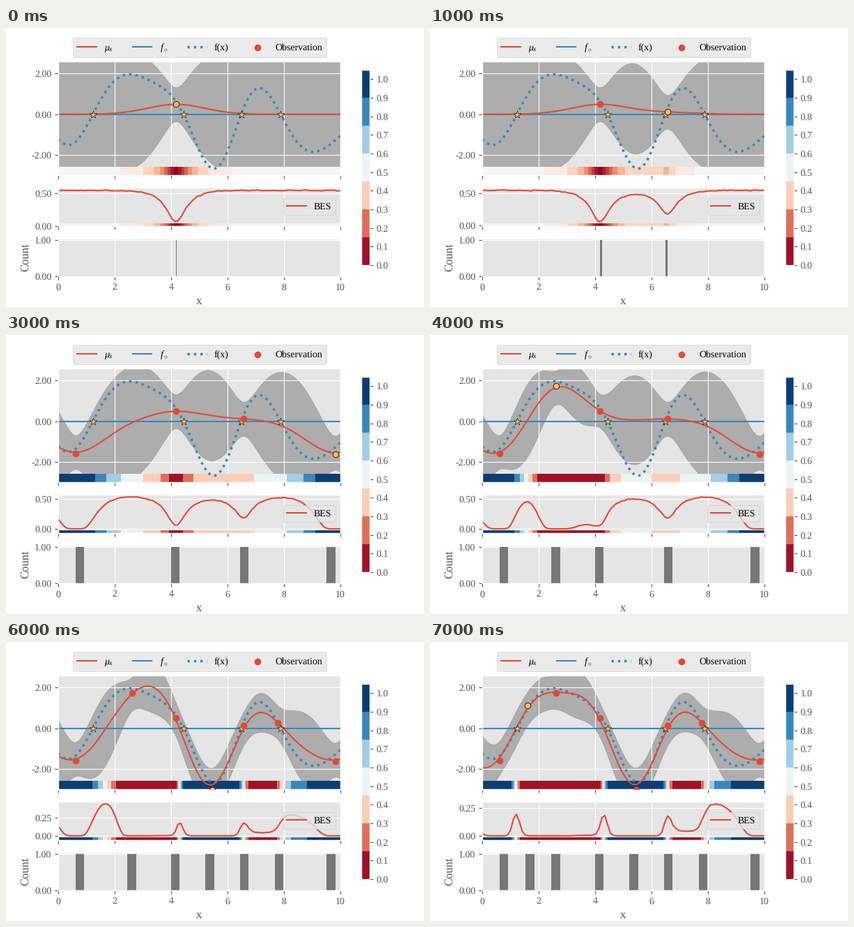
A matplotlib script that plays this animation: 600 px wide and 400 px high, repeating every 8000 ms.

```python
import math

import matplotlib.pyplot as plt
import numpy as np
from matplotlib.animation import FuncAnimation
from matplotlib.ticker import FormatStrFormatter

plt.style.use("ggplot")
plt.rcParams.update({
    "font.family": "Liberation Serif",
    "mathtext.fontset": "custom",
    "mathtext.rm": "Liberation Serif",
    "mathtext.it": "Liberation Serif:italic",
    "text.hinting": "none",
})

RED, BLUE, GRAY, GOLD = "#E24A33", "#348ABD", "#777777", "#FBC15E"
LENGTH, AMP, NOISE = 1.02, 2.16, 0.092
STRIP = 0.08
COARSE = np.arange(8) * 0.15
FINE = np.arange(10) * 0.06

# Samples in the order in which they are taken
OBS_X = np.array([4.173, 6.568, 0.617, 9.815, 2.617, 7.778, 5.457, 1.605])
OBS_Y = np.array([0.505, 0.12, -1.58, -1.61, 1.73, 0.25, -3.0, 1.11])

ROOTS = [1.228, 4.437, 6.482, 7.878]
NODES_X = np.array([0, 0.4, *ROOTS, 2.52, 3, 3.5, 5.53, 7.13, 9.2, 10])
NODES_Y = np.array([-1.22, -1.5, 0, 0, 0, 0, 1.95, 1.8, 1.46, -2.66, 1.28, -1.81, -1.05])

grid = np.linspace(0, 10, 100)
fine = np.linspace(0, 10, 400)

# Lookup tables: normal CDF and binary entropy of its value
Z = np.linspace(-6, 6, 2401)
CDF = np.array([0.5 * (1 + math.erf(z / math.sqrt(2))) for z in Z])
P = np.clip(CDF, 1e-12, 1 - 1e-12)
ENTROPY = -P * np.log(P) - (1 - P) * np.log(1 - P)


def kernel(a, b):
    return AMP * np.exp(-(a[:, None] - b[None, :]) ** 2 / (2 * LENGTH ** 2))


def posterior(x, y, at, noise=NOISE):
    """Mean and variance of a Gaussian process given samples."""
    cov = kernel(x, x) + noise * np.eye(len(x))
    cross = kernel(at, x)
    weights = np.linalg.solve(cov, cross.T)
    var = AMP - np.sum(cross * weights.T, axis=1)
    return weights.T @ y, np.maximum(var, 1e-9)


def entropy_gain(mean, var, seed):
    """Expected information about the sign from one noisy sample."""
    draws = np.random.default_rng(seed).standard_normal((4000, len(mean)))
    total = var + NOISE
    new_mean = mean + var / np.sqrt(total) * draws
    new_sd = np.sqrt(var * NOISE / total)
    after = np.interp(new_mean / new_sd, Z, ENTROPY).mean(axis=0)
    return np.interp(mean / np.sqrt(var), Z, ENTROPY) - after


def draw_strip(ax, prob, low, high, levels):
    ax.contourf(grid, [low, high], np.vstack([prob, prob]), levels=levels,
                cmap="RdBu", vmin=0, vmax=1)


def reset(ax):
    ax.clear()
    ax.set_xlim(0, 10)
    ax.set_xticks(range(0, 11, 2))
    ax.tick_params(labelbottom=ax is ax_count)
    ax.yaxis.set_major_formatter(FormatStrFormatter("%.2f"))


def draw_model(ax, count, prob, levels):
    reset(ax)
    xs, ys = OBS_X[:count], OBS_Y[:count]
    mean, var = posterior(xs, ys, fine)
    half = 1.96 * np.sqrt(var + NOISE)
    low, high = -2.57, 2.58

    # The band lies under the grid
    ax.fill_between(fine, mean - half, mean + half, color=GRAY, alpha=0.5, zorder=0)
    draw_strip(ax, prob, low - STRIP * (high - low), low, levels)
    handles = [
        ax.plot(fine, mean, color=RED, lw=1.5, zorder=2.2, label=r"$\mu_x$")[0],
        ax.axhline(0, color=BLUE, lw=1.5, label=r"$f_\circ$"),
        ax.plot(fine, truth, ":", color=BLUE, lw=2.5, zorder=2.1, label="f(x)")[0],
        ax.scatter(xs, ys, s=36, color=RED, linewidths=1, zorder=4, label="Observation"),
    ]
    ax.scatter(ROOTS, [0] * 4, s=62, marker="*", color=GOLD,
               edgecolors="black", linewidths=0.4, zorder=3)
    ax.scatter(xs[-1:], ys[-1:], s=36, color=GOLD, edgecolors="black",
               linewidths=0.5, zorder=5)
    ax.set_ylim(low - STRIP * (high - low), high)
    ax.set_yticks([-2, 0, 2])
    ax.legend(handles=handles, ncol=4, loc="center",
              bbox_to_anchor=(0.4633, 0.9295), bbox_transform=fig.transFigure,
              borderaxespad=0)


def draw_gain(ax, count, prob, gain, levels):
    reset(ax)
    span = np.ptp(gain)
    low, high = gain.min() - 0.035 * span, gain.max() + 0.065 * span
    bottom = low - STRIP * (high - low)
    if count == 1:
        bottom = min(bottom, 0)
    draw_strip(ax, prob, bottom, bottom + STRIP / (1 + STRIP) * (high - bottom), levels)
    ax.plot(grid, gain, color=RED, lw=1.5, label="BES")

    ax.set_ylim(bottom, high)
    for step in (0.5, 0.25):
        ticks = [t for t in np.arange(0, 1, step) if bottom <= t <= high]
        if len(ticks) > 1:
            break
    ax.set_yticks(ticks)
    ax.legend(loc="center right")


def draw_count(ax, count):
    reset(ax)
    ax.hist(OBS_X[:count], bins=30, color=GRAY)
    ax.set_ylim(0, 1.05)
    ax.set_yticks([0, 1])
    ax.set_xlabel("x")
    ax.set_ylabel("Count")


def draw_scale(ax):
    mids = (COARSE[:-1] + COARSE[1:]) / 2
    ax.pcolormesh([0, 1], COARSE, mids[:, None], cmap="RdBu", vmin=0, vmax=1)
    ax.grid(False)
    ax.set_xticks([])
    ax.set_ylim(0, 1.05)
    ax.set_yticks(np.arange(11) / 10)
    ax.yaxis.tick_right()
    ax.yaxis.set_major_formatter(FormatStrFormatter("%.1f"))


def update(frame):
    count = frame + 1
    mean, var = posterior(OBS_X[:count], OBS_Y[:count], grid)
    prob = 1 - np.interp(mean / np.sqrt(var), Z, CDF)
    levels = FINE if count <= 2 else COARSE
    draw_model(ax_model, count, prob, levels)
    draw_gain(ax_gain, count, prob, entropy_gain(mean, var, frame), levels)
    draw_count(ax_count, count)
    return []


truth, _ = posterior(NODES_X, NODES_Y, fine, noise=1e-4)

fig, (ax_model, ax_gain, ax_count) = plt.subplots(
    3, 1, figsize=(6, 4), dpi=100, gridspec_kw={"height_ratios": [3, 1, 1]})
fig.subplots_adjust(left=0.125, right=0.8, bottom=0.11, top=0.88, hspace=0.2)
draw_scale(fig.add_axes([0.85, 0.15, 0.02, 0.7]))

anim = FuncAnimation(fig, update, frames=8, interval=1000, repeat=True,
                     repeat_delay=0, blit=False)
plt.show()
```
